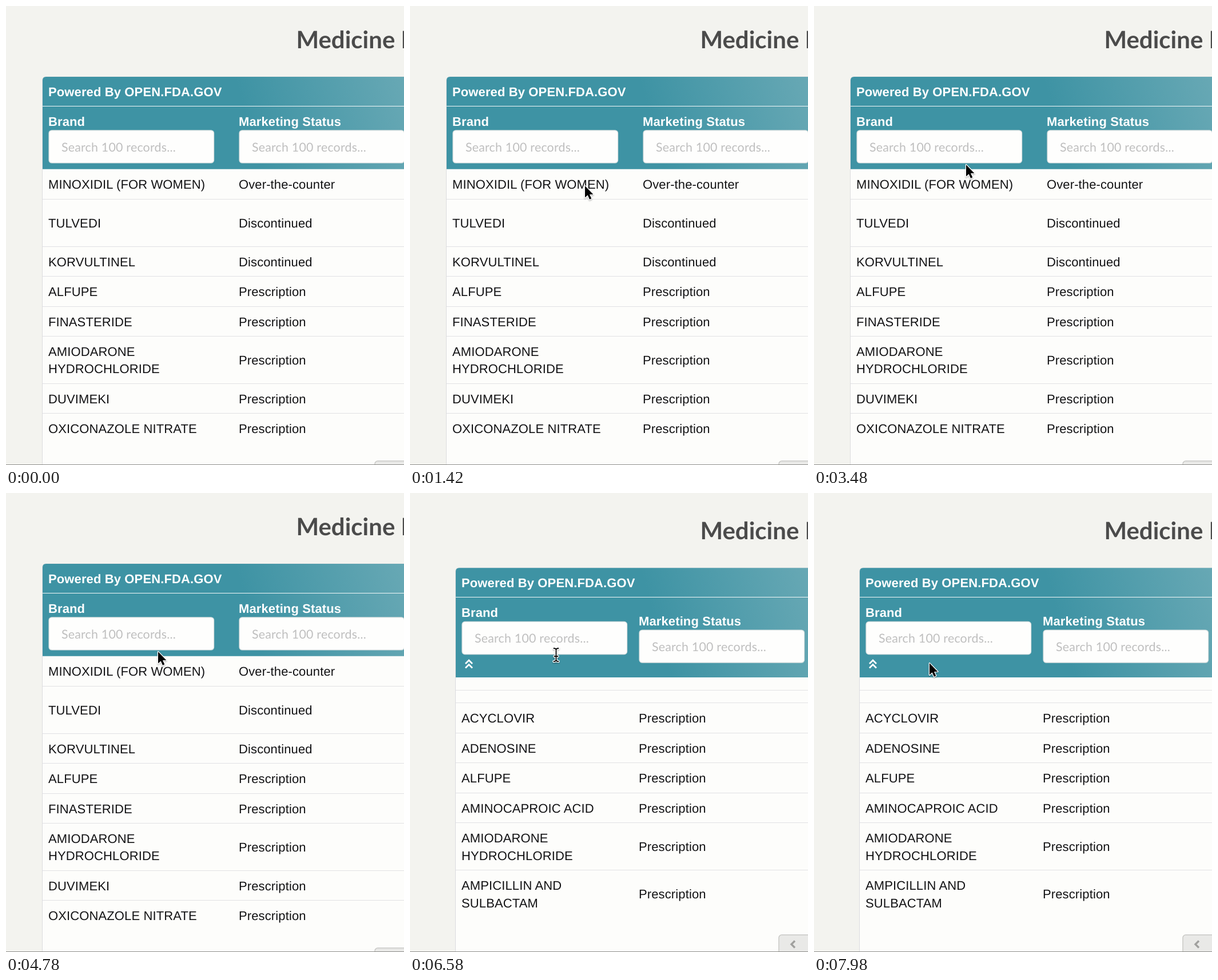
Animation, 696 px wide and 804 px high, one loop 8 s. Source, as an HTML page:

```html
<!DOCTYPE html>
<html lang="en">
<head>
<meta charset="utf-8">
<title>Medicine List</title>
<style>
  html, body { margin: 0; width: 100%; height: 100%; overflow: hidden; background: #f3f3ef; }
  svg { display: block; }
  text { font: 22px "Liberation Sans", Arial, sans-serif; letter-spacing: .12px; fill: #121214;
         text-rendering: geometricPrecision; white-space: pre; }
  .head { font-weight: bold; fill: #fff; }
  .title { font: bold 42px Lato, sans-serif; letter-spacing: 0; fill: #4b4b4b; }
  .hint { font: 21.4px Lato, sans-serif; letter-spacing: .2px; fill: #bfbfbf; }
</style>
</head>
<body>
<svg id="stage" width="696" height="804" viewBox="0 0 696 804">
  <defs>
    <linearGradient id="teal" gradientUnits="userSpaceOnUse" x1="430" y1="230" x2="715" y2="150">
      <stop offset="0" stop-color="#3e93a4"/>
      <stop offset="1" stop-color="#69a9b5"/>
    </linearGradient>
    <filter id="soft" x="-50%" y="-50%" width="200%" height="200%">
      <feDropShadow dx="0" dy="1.5" stdDeviation="1.2" flood-opacity=".3"/>
    </filter>
  </defs>
  <g id="views"></g>
  <path d="M0 803.5H696" stroke="#8d8d8b"/>
  <g id="cursor" filter="url(#soft)" stroke-linejoin="round">
    <path id="arrow" d="M0 0V20.5L4.7 16.2L8 23.7L11.3 22.2L8 14.9H14.4Z"
          stroke="#fff" stroke-width="2.4" paint-order="stroke"/>
    <g id="beam" fill="none" stroke-linecap="round">
      <path d="M-4 -8Q0 -8 0 -5Q0 -8 4 -8M0 -5V13M-3 6H3M-4 15Q0 15 0 12Q0 15 4 15" stroke="#fff" stroke-width="4.4"/>
      <path d="M-4 -8Q0 -8 0 -5Q0 -8 4 -8M0 -5V13M-3 6H3M-4 15Q0 15 0 12Q0 15 4 15" stroke="#111" stroke-width="1.9"/>
    </g>
  </g>
</svg>
<script>
const LOOP = 8000, SORT_TIME = 6180;
const SINGLE = 52.4, DOUBLE = 83, EMPTY = 22.4, LINE = 30.5;
const RX = 'Prescription', OFF = 'Discontinued';

const unsorted = {
  left: 64, top: 124, body: 285.7, column: 407, title: 73.7, inputs: [217.2, 217.2], button: 797,
  rows: [
    ['MINOXIDIL (FOR WOMEN)', 'Over-the-counter', SINGLE],
    ['TULVEDI', OFF, DOUBLE],
    ['KORVULTINEL', OFF, SINGLE],
    ['ALFUPE', RX, SINGLE],
    ['FINASTERIDE', RX, SINGLE],
    ['AMIODARONE\nHYDROCHLORIDE', RX, DOUBLE],
    ['DUVIMEKI', RX, SINGLE],
    ['OXICONAZOLE NITRATE', RX, SINGLE],
  ],
};
const sorted = {
  left: 80, top: 131.2, body: 323, column: 400, title: 81.2, inputs: [224.8, 239.4], button: 774, arrow: true,
  rows: [
    ['', '', EMPTY],
    ['', '', EMPTY],
    ['ACYCLOVIR', RX, SINGLE],
    ['ADENOSINE', RX, SINGLE],
    ['ALFUPE', RX, SINGLE],
    ['AMINOCAPROIC ACID', RX, SINGLE],
    ['AMIODARONE\nHYDROCHLORIDE', RX, DOUBLE],
    ['AMPICILLIN AND\nSULBACTAM', RX, DOUBLE],
  ],
};

const text = (x, y, content, cls = '') => `<text x="${x}" y="${y}" class="${cls}">${content}</text>`;
const rule = (x, y, color) => `<path d="M${x} ${Math.round(y) + .5}H696" stroke="${color}"/>`;

function cell(x, middle, content) {
  const lines = content.split('\n');
  return lines.map((line, i) => text(x, middle + 8.4 + (i - (lines.length - 1) / 2) * LINE, line)).join('');
}

function filter(x, y, label) {
  return text(x, y - 7.4, label, 'head') +
    `<rect x="${x + 1}" y="${y + .6}" width="288.6" height="57.2" rx="5" fill="#fefefd" stroke="#d5dddd" stroke-width="1.2"/>` +
    text(x + 23, y + 37.5, 'Search 100 records...', 'hint');
}

function view(v) {
  const x = v.left + 10;
  let out = text(507.4, v.title, 'Medicine List', 'title');
  out += `<rect x="${v.left - .5}" y="${v.top}" width="800" height="800" rx="6" fill="#fdfdfb" stroke="#dcdcdf"/>`;
  out += `<path d="M${v.left} ${v.body}V${v.top + 6}q0 -6 6 -6H696V${v.body}Z" fill="url(#teal)"/>`;
  out += rule(v.left, v.top + 51, '#f2f8f8');
  out += text(x, v.top + 33.6, 'Powered By OPEN.FDA.GOV', 'head');
  out += filter(x, v.inputs[0], 'Brand') + filter(v.column, v.inputs[1], 'Marketing Status');
  if (v.arrow) {
    out += '<path d="M97 299l6 -6l6 6M97 306.5l6 -6l6 6" fill="none" stroke="#fff" stroke-width="2.8"/>';
  }
  let y = v.body;
  v.rows.forEach(([brand, status, height], i) => {
    out += cell(x, y + height / 2, brand) + cell(v.column, y + height / 2, status);
    y += height;
    if (i < v.rows.length - 1) out += rule(v.left, y - .3, '#e1e1e4');
  });
  out += `<rect x="645" y="${v.button}" width="90" height="60" rx="5" fill="#e9e9e7" stroke="#c9c9c6" stroke-width="1.5"/>`;
  out += `<path d="M673 ${v.button + 10.5}l-6 6l6 6" fill="none" stroke="#a0a09e" stroke-width="3.4"/>`;
  return `<g>${out}</g>`;
}

const byId = id => document.getElementById(id);
const views = byId('views');
views.innerHTML = view(unsorted) + view(sorted);
const [before, after] = views.children;

// Pointer stops: time, x, y
const stops = [
  [250, 480, 806], [820, 340, 380], [1300, 306, 315], [1660, 306, 315], [2350, 255, 264],
  [2600, 255, 264], [3200, 266, 278], [5050, 266, 278], [5650, 255.5, 280],
  [6750, 255.5, 280], [7400, 202, 298],
];

function pointerAt(t) {
  const next = stops.findIndex(s => s[0] > t);
  if (next < 1) return next ? stops.at(-1).slice(1) : stops[0].slice(1);
  const [t0, x0, y0] = stops[next - 1], [t1, x1, y1] = stops[next];
  const u = (t - t0) / (t1 - t0), e = u * u * (3 - 2 * u);
  return [x0 + (x1 - x0) * e, y0 + (y1 - y0) * e];
}

const show = (node, visible) => node.setAttribute('display', visible ? 'inline' : 'none');

function draw(now) {
  const t = now % LOOP, isSorted = t >= SORT_TIME;
  const [x, y] = pointerAt(t);
  const overInput = isSorted && y < 283;
  show(before, !isSorted);
  show(after, isSorted);
  show(byId('cursor'), t >= stops[0][0]);
  show(byId('arrow'), !overInput);
  show(byId('beam'), overInput);
  byId('cursor').setAttribute('transform', `translate(${x} ${y})`);
  requestAnimationFrame(() => draw(performance.now()));
}
draw(0);
</script>
</body>
</html>
```
